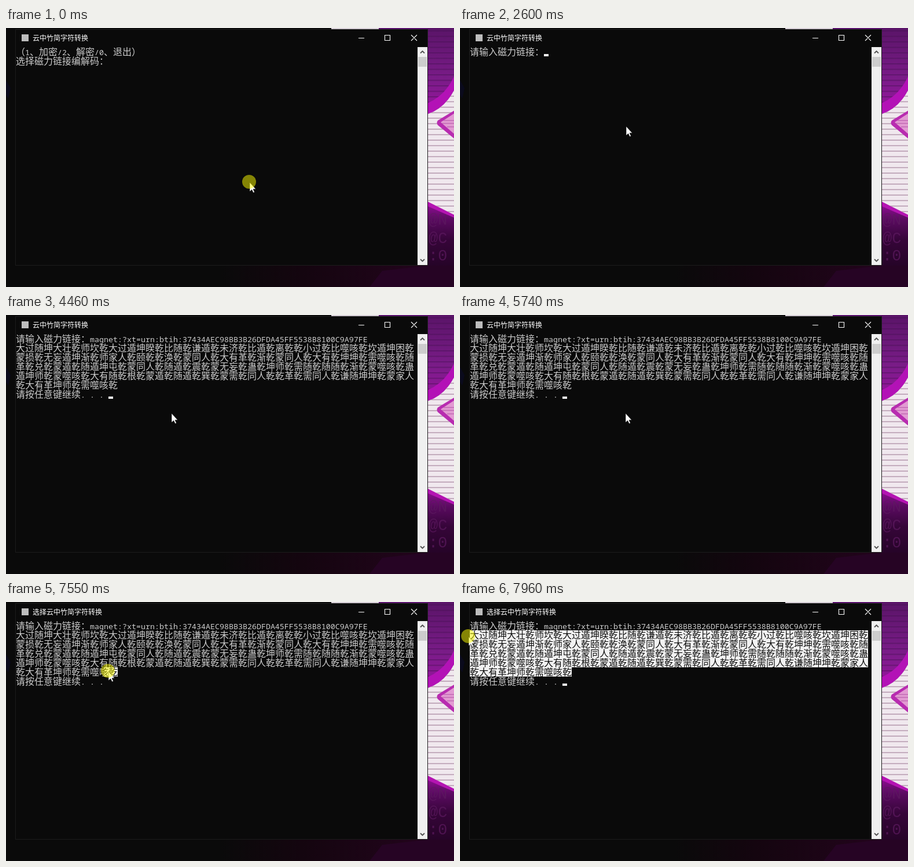
Recreate the animation shown at these times as an HTML page. Size 774 px wide and 448 px high, loop 8 s.

```html
<!DOCTYPE html>
<html lang="zh-CN">
<head>
<meta charset="utf-8">
<title>Console</title>
<style>
html, body { margin: 0; width: 100%; height: 100%; overflow: hidden; background: #0a0a0a; }
svg { display: block; width: 774px; height: 448px; }
text { white-space: pre; text-spacing-trim: space-all; font: 300 16px "Noto Sans CJK SC", "Noto Sans CJK", sans-serif; }
.ascii { font: 300 13.333px "Noto Sans Mono", "Liberation Mono", monospace; }
#title { font-size: 12px; font-weight: 400; fill: #fff; }
.mark { font: 400 27px "Liberation Mono", monospace; fill: #5c1a60; fill-opacity: .7; }
</style>
</head>
<body>
<svg viewBox="0 0 774 448">
  <defs>
    <linearGradient id="violet" x2="0" y2="1">
      <stop offset="0" stop-color="#5a1468"/><stop offset=".55" stop-color="#7a1c88"/><stop offset="1" stop-color="#a012a4"/>
    </linearGradient>
    <linearGradient id="dusk" x2="0" y2="1">
      <stop offset="0" stop-color="#9c0fa0"/><stop offset=".3" stop-color="#5a0a60"/>
      <stop offset=".6" stop-color="#360539"/><stop offset="1" stop-color="#260428"/>
    </linearGradient>
    <linearGradient id="floor">
      <stop offset="0" stop-color="#0a0a0a"/><stop offset=".35" stop-color="#14050f"/><stop offset="1" stop-color="#26041f"/>
    </linearGradient>
    <clipPath id="disc"><path d="M728 149Q757 140 774 108V323L728 300Z"/></clipPath>
    <clipPath id="selClip"><path id="selShape"/></clipPath>
  </defs>

  <rect width="774" height="448" fill="#0a0a0a"/>
  <path d="M0 90l8 14-4 18-4-6z" fill="#0a0a1c"/>
  <rect x="370" y="410" width="404" height="38" fill="url(#floor)"/>
  <path d="M628 448L650 420 728 411H774V448Z" fill="#260424"/>
  <rect x="562" width="82" height="2" fill="#d8d0d8"/>
  <rect x="644" width="130" height="2" fill="#5c1470"/>
  <rect x="728" width="46" height="160" fill="url(#violet)"/>
  <path id="stripes" stroke="#43104f" stroke-opacity=".4" stroke-width="2"/>
  <path d="M728 130Q758 118 774 84V108Q757 140 728 149Z" fill="#b312b6"/>
  <rect x="728" y="298" width="46" height="113" fill="url(#dusk)"/>
  <path d="M728 298L774 320V328L728 308Z" fill="#b414b2"/>
  <g clip-path="url(#disc)">
    <rect x="728" y="100" width="46" height="230" fill="#f0e8ee"/>
    <path id="scan" stroke="#b497ac" stroke-width="1.6"/>
  </g>
  <path d="M774 143L746 160Q743 164 746 168L774 191Z" fill="#b82cb0"/>
  <path d="M774 148L751 163 774 183Z" fill="#e29ad2"/>
  <path d="M756 160h18M753 165h21M762 171h12" stroke="#b050a4" stroke-width="1.2"/>
  <text class="mark" x="730" y="340">@N</text>
  <text class="mark" x="730" y="372">@C</text>
  <text class="mark" x="730" y="402">:0</text>

  <rect x="16.5" y="2.5" width="712" height="408" fill="#0a0a0a" stroke="#1c1c1c"/>
  <rect x="27" y="11" width="12" height="12" fill="#bdbdbd"/>
  <text id="title" x="46" y="22"></text>
  <path d="M609 17.500h10M654.500 12.500h9v9h-9zM700 12l10 10M710 12l-10 10" fill="none" stroke="#fff" stroke-width="1.1"/>
  <rect x="711" y="33" width="17" height="377" fill="#f0f0f0"/>
  <rect x="712" y="50" width="15" height="17" fill="#cdcdcd"/>
  <path d="M716 43.500l3.500-3.500 3.500 3.500M716 400l3.500 3.500 3.500-3.500" fill="none" stroke="#505050" stroke-width="1.8"/>

  <g id="screen" fill="#cccccc"></g>
  <path id="selFill" fill="#f2f2f2"/>
  <g id="selText" clip-path="url(#selClip)" fill="#0c0c0c"></g>
  <rect id="caret" width="8" height="4" fill="#f2f2f2"/>
  <path id="arrow" d="M0 0V16L3.700 12.700 6.200 18 8.500 17 6.100 11.800H10.800Z" fill="#fff" stroke="#000" stroke-width=".6"/>
  <circle id="click" r="12" fill="#ff0" fill-opacity=".5"/>
</svg>
<script>
const $ = id => document.getElementById(id);
const LOOP = 8000, LEFT = 17, TOP = 33, ROW = 16, RIGHT = 705;
const TITLE = "云中竹简字符转换";

const menu = ["（1、加密/2、解密/0、退出）", "选择磁力链接编解码："];
const ask = "请输入磁力链接：";
const link = ask + "magnet:?xt=urn:btih:37434AEC98BB3B26DFDA45FF5538B8100C9A97FE";
const output = [
  "大过随坤大壮乾师坎乾大过遁坤睽乾比随乾谦遁乾未济乾比遁乾离乾乾小过乾比噬咳乾坎遁坤困乾",
  "蒙损乾无妄遁坤渐乾师家人乾颐乾乾涣乾蒙同人乾大有革乾渐乾蒙同人乾大有乾坤坤乾需噬咳乾随",
  "革乾兑乾蒙遁乾随遁坤屯乾蒙同人乾随遁乾震乾蒙无妄乾蛊乾坤师乾需随乾随随乾渐乾蒙噬咳乾蛊",
  "遁坤师乾蒙噬咳乾大有随乾根乾蒙遁乾随遁乾巽乾蒙需乾同人乾乾革乾需同人乾谦随坤坤乾蒙家人",
  "乾大有革坤师乾需噬咳乾"
];
const screens = [
  [0, menu],
  [1810, [menu[0], menu[1] + "1"]],
  [2600, [ask]],
  [3490, [link]],
  [4460, [link, ...output, "请按任意键继续. . . "]]
];

// time, x, row, visible
const carets = [
  [0, 177, 1, 0], [510, 177, 1, 1], [1070, 177, 1, 0], [1580, 177, 1, 1],
  [1810, 185, 1, 1], [2090, 185, 1, 0], [2550, 17, 2, 1], [2600, 145, 0, 1],
  [3160, 145, 0, 0], [3490, 625, 0, 1], [4210, 625, 0, 0], [4460, 177, 6, 1],
  [5230, 177, 6, 0], [5740, 177, 6, 1], [6300, 177, 6, 0], [6800, 177, 6, 1],
  [7320, 177, 6, 0], [7860, 177, 6, 1]
];

// time, x, y of the pointer tip
const pointer = [
  [0, 421, 267], [90, 421, 267], [490, 287, 169], [1810, 287, 169], [1910, 287, 170],
  [3669, 287, 170], [3670, 286, 170], [6270, 286, 170], [6760, 184, 128],
  [6890, 182, 88], [7090, 189, 125], [7520, 189, 125], [7680, 67, 77], [7940, 15, 60]
];
const presses = [[0, 100], [3490, 3620], [7140, LOOP]];

const latest = (list, t) => list.findLast(item => item[0] <= t);

function pointerAt(t) {
  const i = pointer.findIndex(p => p[0] > t);
  if (i < 0) return pointer.at(-1).slice(1);
  const [t0, x0, y0] = pointer[i - 1], [t1, x1, y1] = pointer[i];
  const u = (t - t0) / (t1 - t0), k = u * u * (3 - 2 * u);
  return [Math.round(x0 + (x1 - x0) * k), Math.round(y0 + (y1 - y0) * k)];
}

// Wide characters take 16 px, ASCII takes 8 px
function textRow(text, row) {
  let x = LEFT;
  return text.match(/[ -~]+|[^ -~]+/g).map(run => {
    const ascii = /^[ -~]/.test(run);
    const markup = `<text x="${x}" y="${TOP + row * ROW + 14}"${ascii ? ' class="ascii"' : ""}>${run}</text>`;
    x += run.length * (ascii ? 8 : 16);
    return markup;
  }).join("");
}

function selection(x, y) {
  const last = 5, end = 193;
  const first = Math.max(1, Math.min(last, Math.floor((y - TOP) / ROW)));
  let start = LEFT + 8 * Math.max(0, Math.floor((x - 20) / 8));
  if (first === last) start = Math.min(start, 177);
  let d = "";
  for (let row = first; row <= last; row++) {
    const from = row === first ? start : LEFT, to = row === last ? end : RIGHT;
    d += `M${from} ${TOP + row * ROW}H${to}v${ROW}H${from}z`;
  }
  return d;
}

function lines(from, to, step) {
  let d = "";
  for (let y = from; y < to; y += step) d += `M728 ${y}h46`;
  return d;
}

let shown;
function render(t) {
  const rows = latest(screens, t)[1];
  if (rows !== shown) {
    $("screen").innerHTML = rows.map(textRow).join("");
    shown = rows;
  }

  const [, caretX, caretRow, on] = latest(carets, t);
  $("caret").setAttribute("x", caretX);
  $("caret").setAttribute("y", TOP + caretRow * ROW + 12);
  $("caret").setAttribute("opacity", on);

  const [x, y] = pointerAt(t);
  const pressed = presses.some(([a, b]) => t >= a && t < b);
  $("arrow").setAttribute("transform", `translate(${x} ${y})`);
  $("click").setAttribute("transform", `translate(${x - 1} ${y - 1})`);
  $("click").setAttribute("opacity", pressed ? 1 : 0);

  const selecting = t >= 7140;
  const shape = selecting ? selection(x, y) : "";
  $("selFill").setAttribute("d", shape);
  $("selShape").setAttribute("d", shape);
  $("title").textContent = (selecting ? "选择" : "") + TITLE;
}

$("stripes").setAttribute("d", lines(5, 140, 9.5));
$("scan").setAttribute("d", lines(118, 325, 9.5));
$("selText").innerHTML = screens.at(-1)[1].map(textRow).join("");

const began = performance.now();
function tick() {
  render((performance.now() - began) % LOOP);
  requestAnimationFrame(tick);
}
tick();
</script>
</body>
</html>
```
